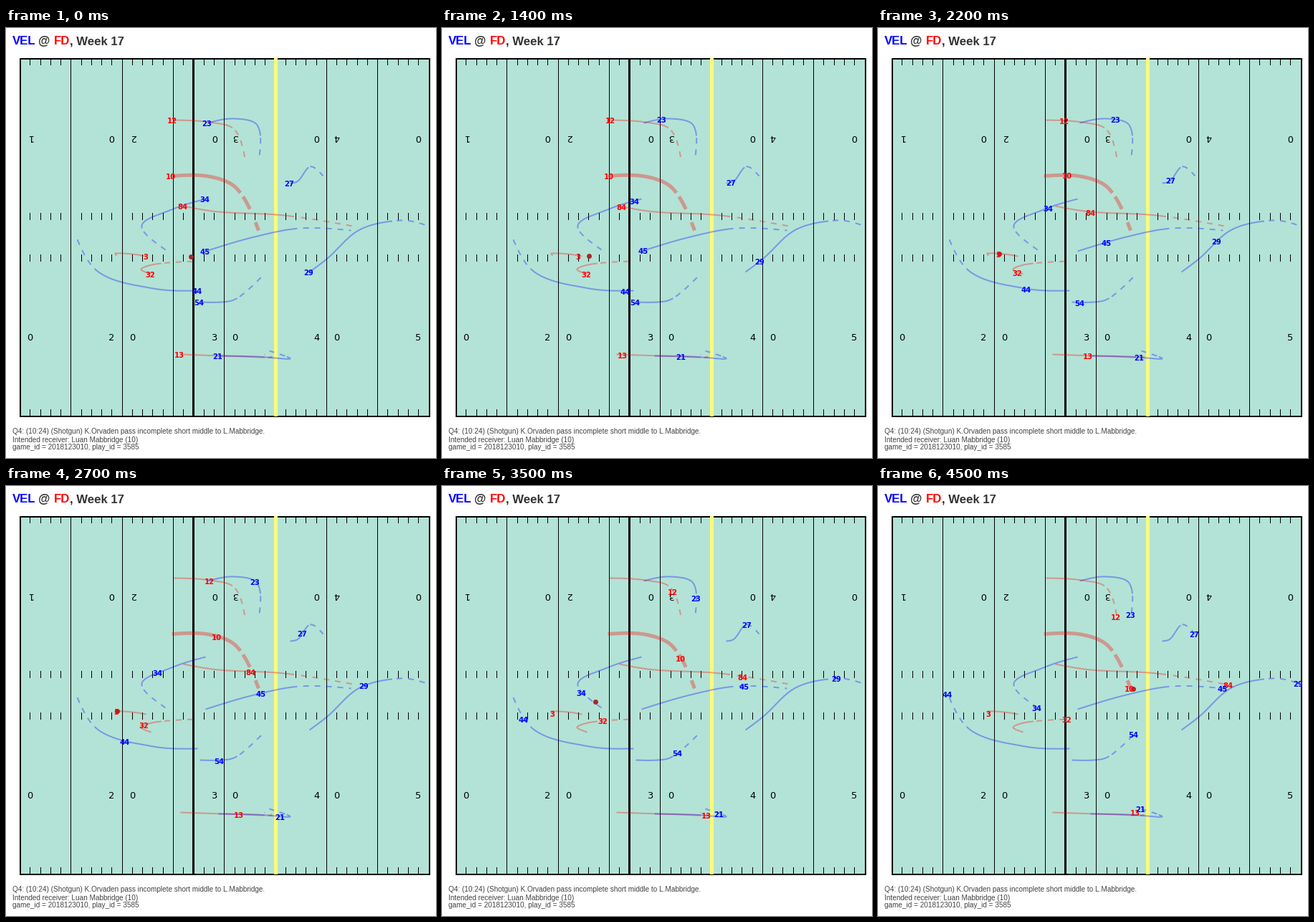
A matplotlib script that plays this animation: 600 by 600 pixels, repeating every 5400 ms.

```python
import numpy as np
import matplotlib.pyplot as plt
from matplotlib.animation import FuncAnimation
from matplotlib.patches import Rectangle

SIZE, DPI = 600, 100
PT = 72 / DPI
FRAMES, LAST = 54, 45
SNAP, CAUGHT, THROW, ARRIVE = 10, 15, 33, 39
RED, BLUE, TURF, GOLD = "#ff0000", "#0000ff", "#b3e3d6", "#fff97a"
LEFT, TOP, BOTTOM = 19, 43, 542
YARDS, YARD = 40, 14.2625

fig = plt.figure(figsize=(SIZE / DPI, SIZE / DPI), dpi=DPI, facecolor="white")
ax = fig.add_axes([0, 0, 1, 1])
ax.set(xlim=(0, SIZE), ylim=(SIZE, 0))
ax.axis("off")


def write(x, y, text, px, color="black", font="Liberation Sans", **kw):
    return ax.text(x, y, text, fontsize=px * PT, color=color, family=font,
                   va="baseline", **kw)


def yard_x(yard):
    """Centre of the pixel column nearest to a yard line."""
    return np.floor(LEFT + yard * YARD + 0.5) + 0.5


def vline(yard, y0=TOP, y1=BOTTOM, px=1, color="black", z=2):
    ax.plot([yard_x(yard)] * 2, [y0, y1], color=color, lw=px * PT, zorder=z,
            solid_capstyle="butt", snap=False)


def draw_field():
    x0, width = LEFT + 1, YARDS * YARD
    ax.add_patch(Rectangle((x0, TOP), width, BOTTOM - TOP, fc=TURF,
                           ec="black", lw=2 * PT, zorder=1))
    for yard in range(1, YARDS):
        if yard % 5 == 0:
            vline(yard)
            continue
        for y0, y1 in ((TOP, 52), (258, 268), (316, 326), (532, BOTTOM)):
            vline(yard, y0, y1)
    vline(17, px=3)
    vline(25, TOP - 1, px=5, color=GOLD, z=3)

    style = dict(font="DejaVu Sans", ha="center", zorder=4)
    for line in range(0, YARDS + 1, 10):
        tens = str(line // 10 + 1)
        for yard, low, high in ((line - 1, tens, "0"), (line + 1, "0", tens)):
            if 0 < yard < YARDS:
                write(yard_x(yard), 435.5, low, 13, **style)
                write(yard_x(yard), 149, high, 13, rotation=180,
                      rotation_mode="anchor", **style)


def draw_text():
    for x, text, color in ((9, "VEL", BLUE), (45, "@", "#333333"),
                           (67, "FD", RED), (89, ", Week 17", "#333333")):
        write(x, 23, text, 16.8, color, weight="bold")
    lines = (
        "Q4: (10:24) (Shotgun) K.Orvaden pass incomplete short middle"
        " to L.Mabbridge.",
        "Intended receiver: Luan Mabbridge (10)",
        "game_id = 2018123010, play_id = 3585",
    )
    for i, line in enumerate(lines):
        write(9, 566.5 + 11 * i, line, 10, "#444444")


def smooth_curve(points, steps=40):
    """Dense cubic curve through the points, with its arc length."""
    p = np.array(points, float)
    s = np.r_[0, np.cumsum(np.hypot(*np.diff(p, axis=0).T))]
    d = np.diff(p, axis=0) / np.diff(s)[:, None]
    inner = (p[2:] - p[:-2]) / (s[2:] - s[:-2])[:, None]
    m = np.vstack([1.5 * d[0] - 0.5 * inner[0], inner,
                   1.5 * d[-1] - 0.5 * inner[-1]])
    u = np.linspace(0, 1, steps)[:, None]
    parts = []
    for i, h in enumerate(np.diff(s)):
        a, b = m[i] * h, m[i + 1] * h
        gap = p[i + 1] - p[i]
        parts.append(p[i] + u * a + u**2 * (3 * gap - 2 * a - b)
                     + u**3 * (a + b - 2 * gap))
    xy = np.vstack(parts)
    return xy, np.r_[0, np.cumsum(np.hypot(*np.diff(xy, axis=0).T))]


class Player:
    """A jersey number that eases along a route.

    start and stop bound the run; drift is the share of steady motion.
    """

    def __init__(self, number, color, *route, start=11, stop=49, drift=0,
                 width=2):
        self.xy, self.length = smooth_curve(route)
        self.start, self.stop, self.drift = start, stop, drift
        self.trace(0, THROW, color, width, "-")
        self.trace(THROW + 1, LAST, color, width, (0, (4, 4)))
        self.label = write(0, 0, str(number), 10, color, "DejaVu Sans",
                           weight="bold", ha="center", zorder=7, clip_on=True)
        self.label.set_clip_path(clip)

    def ease(self, t):
        u = np.clip((t - self.start) / (self.stop - self.start), 0, 1)
        return u * u * (3 - 2 * u)

    def at(self, t):
        run = self.ease(t) / self.ease(LAST)
        done = self.drift * t / LAST + (1 - self.drift) * run
        dist = done * self.length[-1]
        return np.array([np.interp(dist, self.length, c) for c in self.xy.T])

    def trace(self, begin, end, color, width, style):
        x, y = self.at(np.linspace(begin, end, 8 * (end - begin) + 1))
        ax.plot(x + 0.5, y + 0.5, color=color, alpha=0.33, lw=width * PT,
                ls=style, zorder=5, solid_capstyle="butt",
                dash_capstyle="butt")

    def move(self, t):
        x, y = self.at(t)
        self.label.set_position((x - 0.7, y + 5.4))


draw_field()
draw_text()
clip = Rectangle((LEFT, TOP), YARDS * YARD + 2, BOTTOM - TOP,
                 transform=ax.transData)

passer = Player(3, RED, (195, 318), (176, 315), (152, 314), (154, 317),
                start=10, stop=32)
players = [
    passer,
    Player(12, RED, (233, 128), (284, 131), (318, 141), (333, 182)),
    Player(10, RED, (231, 206), (285, 207), (322, 224), (352, 282), width=5),
    Player(84, RED, (247, 248), (296, 256), (388, 261), (489, 277)),
    Player(32, RED, (202, 343), (188, 336), (208, 329), (264, 325),
           start=16, stop=54),
    Player(13, RED, (243, 455), (306, 457), (370, 459), (360, 455),
           start=9, stop=41),
    Player(23, BLUE, (281, 132), (318, 126), (350, 135), (353, 179),
           start=2, stop=48, drift=0.4),
    Player(27, BLUE, (396, 216), (407, 213), (424, 193), (442, 206),
           start=18, stop=50, drift=0.4),
    Player(34, BLUE, (278, 238), (233, 252), (189, 275), (222, 309),
           start=8, stop=48),
    Player(45, BLUE, (278, 311), (346, 291), (410, 279), (481, 282)),
    Player(29, BLUE, (423, 340), (448, 321), (493, 281), (550, 268),
           (587, 275), stop=44, drift=0.4),
    Player(44, BLUE, (267, 366), (205, 363), (130, 341), (97, 290),
           start=9, stop=45),
    Player(54, BLUE, (270, 382), (310, 381), (326, 374), (357, 346),
           start=14, stop=54),
    Player(21, BLUE, (296, 457), (350, 458), (396, 461), (367, 450),
           start=4, stop=36, drift=0.7),
]

SPOT, TARGET, REST = map(np.array, ((257, 318), (333, 268), (355, 282)))
ball, = ax.plot([], [], "o", color="brown", ms=7 * PT, mew=0, zorder=6)


def ball_at(t):
    """Snap, hold, throw, then a drop beside the receiver."""
    def glide(a, b, t0, t1):
        return a + (b - a) * np.clip((t - t0) / (t1 - t0), 0, 1)

    if t <= THROW:
        return glide(SPOT, passer.at(t), SNAP, CAUGHT)
    if t <= ARRIVE:
        return glide(passer.at(THROW), TARGET, THROW, ARRIVE)
    return glide(TARGET, REST, ARRIVE, LAST)


def update(frame):
    t = min(frame, LAST)
    for player in players:
        player.move(t)
    x, y = ball_at(t)
    ball.set_data([x + 0.5], [y + 0.5])
    return [ball, *(p.label for p in players)]


anim = FuncAnimation(fig, update, frames=FRAMES, interval=100,
                     init_func=lambda: update(0), repeat=True, repeat_delay=0)
plt.show()
```
